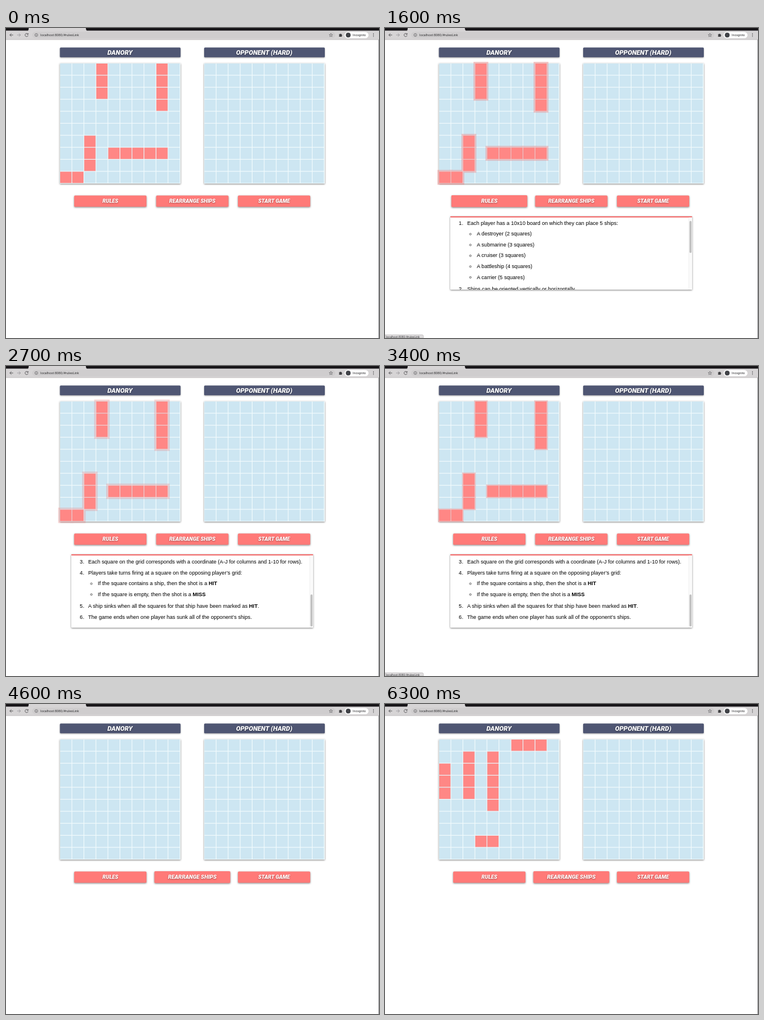
An HTML page for the animation above (6400 ms loop, 640 px wide and 532 px high).

```html
<!DOCTYPE html>
<html lang="en">
<head>
<meta charset="utf-8">
<title>Ship game</title>
<style>
  html, body { margin: 0; width: 100%; height: 100%; overflow: hidden; background: #fff; }
  svg { display: block; width: 100%; height: 100%; }
  .chrome { font-family: Roboto, sans-serif; }
  .comic { font-family: Roboto, sans-serif; font-style: italic; font-weight: 900; fill: #fff; text-anchor: middle; }
  .comic, .raised { filter: drop-shadow(0 1px 1px rgba(0, 0, 0, .35)); }
  .board, .button, #panel { filter: drop-shadow(0 1.5px 1.5px rgba(0, 0, 0, .5)); }
  #list { font: 9.08px "Liberation Sans", Arial, sans-serif; }
  .number { text-anchor: end; }
</style>
</head>
<body>
<svg id="stage" viewBox="0 0 640 532" preserveAspectRatio="none">
  <defs>
    <clipPath id="panelClip"><rect id="reveal" x="105" y="318" width="430"/></clipPath>
    <clipPath id="listClip"><rect x="112" y="325" width="415" height="124"/></clipPath>
  </defs>

  <g class="chrome">
    <rect width="640" height="6" fill="#171518"/>
    <path d="M36 6Q39 5 39 0H137Q137 5 141 6Z" fill="#d6d4d5"/>
    <rect y="4.5" width="640" height="15.5" fill="#d6d4d5"/>
    <rect x="45" y="6.5" width="520" height="11" rx="5.5" fill="#cfcdce"/>
    <path d="M0 20H640" stroke="#b5b3b4" stroke-width=".7"/>
    <g fill="none" stroke="#4b4b4d" stroke-width=".9">
      <path d="M12.3 12H6.7M9.2 9.4L6.6 12L9.2 14.6"/>
      <path d="M19.2 12H24.8M22.3 9.4L24.9 12L22.3 14.6" stroke="#97959a"/>
      <path d="M37.4 10.2A2.7 2.7 0 1 0 38 12.8M38 9V11H35.8"/>
      <circle cx="52" cy="12" r="2.5" stroke-width=".6"/>
      <path d="M52 11.7V13.5M52 10.4V11" stroke-width=".7"/>
      <path d="M557.5 9.2L558.3 11.2L560.4 11.3L558.8 12.7L559.3 14.8L557.5 13.6L555.7 14.8L556.2 12.7L554.6 11.3L556.7 11.2Z" stroke-width=".6"/>
    </g>
    <text x="59" y="14" font-size="5.7" fill="#343436">localhost:8080/#rulesLink</text>
    <path d="M571.5 10.5H573A1.1 1.1 0 0 1 575 10.5H576.2V11.8A1.1 1.1 0 0 1 576.2 13.8V15H571.5V13.4A1 1 0 0 0 571.5 11.9Z" fill="#404043"/>
    <rect x="581" y="6.8" width="41" height="10.8" rx="5.4" fill="#fff"/>
    <circle cx="587.2" cy="12.2" r="4.1" fill="#404247"/>
    <text x="595" y="14.2" font-size="5.4" fill="#303033">Incognito</text>
    <g fill="#404043"><circle cx="630.5" cy="9.8" r=".7"/><circle cx="630.5" cy="12.2" r=".7"/><circle cx="630.5" cy="14.6" r=".7"/></g>
    <path d="M639.5 20V532" stroke="#77777a" stroke-width=".8"/>
  </g>

  <g id="boards"></g>
  <g id="halo"></g>
  <g id="ships"></g>
  <g id="buttons"></g>

  <g clip-path="url(#panelClip)">
    <g id="panel">
      <rect x="112" y="323" width="415" height="126" rx="1.5" fill="#fff"/>
      <rect x="112" y="323" width="415" height="2.2" rx="1" fill="#f37575"/>
    </g>
    <g clip-path="url(#listClip)">
      <g id="list"></g>
      <rect x="521.2" y="325" width="5.8" height="124" fill="#fafafa"/>
      <path d="M521.2 325V449" stroke="#e8e8e8" stroke-width=".6"/>
      <rect id="thumb" x="522.4" width="3.6" height="55" rx="1.8" fill="#c1c1c1"/>
    </g>
  </g>

  <g id="status" class="chrome">
    <path d="M0 526.5H64Q66 526.5 66 529V532H0Z" fill="#dedcdd" stroke="#b4b2b3" stroke-width=".6"/>
    <text x="1.5" y="532.2" font-size="5" fill="#49494c">localhost:8080/#rulesLink</text>
  </g>
</svg>

<script>
const LOOP = 6400, STEP = 100, CELL = 20.62, TOP = 61;
const $ = id => document.getElementById(id);

function add(parent, tag, attrs, text = '') {
  const node = document.createElementNS('http://www.w3.org/2000/svg', tag);
  for (const key in attrs) node.setAttribute(key, attrs[key]);
  node.textContent = text;
  return parent.appendChild(node);
}

function addCell(parent, x, col, row, fill, spread = 0) {
  add(parent, 'rect', {
    x: x + col * CELL - spread, y: TOP + row * CELL - spread,
    width: CELL - 1.2 + 2 * spread, height: CELL - 1.2 + 2 * spread, fill
  });
}

function addBoard(x, title) {
  const g = $('boards');
  add(g, 'rect', { x: x - .5, y: 33.5, width: 207, height: 16.8, rx: 1.5, fill: '#4f5673', class: 'raised' });
  add(g, 'text', { x: x + 102.5, y: 45.8, 'font-size': 11.2, class: 'comic' }, title);
  add(g, 'rect', { x: x - .5, y: 60.5, width: 207, height: 206.5, fill: '#f1fafc', class: 'board' });
  for (let i = 0; i < 100; i++) addCell(g, x, i % 10, Math.floor(i / 10), '#cde6f2');
}
addBoard(93, 'DANORY');
addBoard(340.5, 'OPPONENT (HARD)');

function addButton(x, label) {
  const g = add($('buttons'), 'g', {});
  add(g, 'rect', { x: x - 62, y: 287.5, width: 124, height: 19.2, rx: 1.5, fill: '#ff7a78', class: 'button' });
  add(g, 'text', { x, y: 300.3, 'font-size': 9.1, class: 'comic' }, label);
  return scale => g.setAttribute('transform',
    `translate(${x} 297) scale(${scale}) translate(${-x} -297)`);
}
const scaleRules = addButton(179, 'RULES');
const scaleRearrange = addButton(319.7, 'REARRANGE SHIPS');
addButton(460, 'START GAME');

// A leading "-" marks a nested line; *word* is bold.
const rules = [
  'Each player has a 10x10 board on which they can place 5 ships:',
  '-A destroyer (2 squares)', '-A submarine (3 squares)', '-A cruiser (3 squares)',
  '-A battleship (4 squares)', '-A carrier (5 squares)',
  'Ships can be oriented vertically or horizontally.',
  'Each square on the grid corresponds with a coordinate (A-J for columns and 1-10 for rows).',
  'Players take turns firing at a square on the opposing player’s grid:',
  '-If the square contains a ship, then the shot is a *HIT*',
  '-If the square is empty, then the shot is a *MISS*',
  'A ship sinks when all the squares for that ship have been marked as *HIT*.',
  'The game ends when one player has sunk all of the opponent’s ships.'
];
let y = 337.8, number = 0;
rules.forEach((rule, i) => {
  const nested = rule[0] === '-';
  if (i) y += !nested && rules[i - 1][0] === '-' ? 20.5 : 18.55;
  if (nested) add($('list'), 'circle', { cx: 146.5, cy: y - 2.6, r: 1.5, fill: 'none', stroke: '#000', 'stroke-width': .6 });
  else add($('list'), 'text', { x: 134.2, y, class: 'number' }, `${++number}.`);
  const line = add($('list'), 'text', { x: nested ? 157.5 : 141, y });
  rule.slice(nested ? 1 : 0).split('*').forEach((part, j) =>
    add(line, 'tspan', { 'font-weight': j % 2 ? 700 : 400 }, part));
});

// Each ship: column, row, length, vertical.
const layouts = [
  { start: 0, ships: [[3, 0, 3, 1], [8, 0, 4, 1], [2, 6, 3, 1], [4, 7, 5, 0], [0, 9, 2, 0]] },
  { start: 4500, ships: [] },
  { start: 4900, ships: [[0, 0, 5, 1], [1, 4, 3, 0], [4, 2, 3, 0], [4, 3, 2, 0], [9, 1, 4, 1]] },
  { start: 6300, ships: [[6, 0, 3, 0], [2, 1, 4, 1], [4, 1, 5, 1], [0, 2, 3, 1], [3, 8, 2, 0]] }
];

const clamp = v => Math.max(0, Math.min(1, v));
const smooth = v => v * v * (3 - 2 * v);
const ramp = (t, from, to) => smooth(clamp((t - from) / (to - from)));
const between = (t, from, to) => t >= from && t < to;

function drawShips(t) {
  const { start, ships } = layouts.filter(l => l.start <= t).pop();
  const phase = (t - start) % 1000 / 1000;
  $('halo').replaceChildren();
  $('ships').replaceChildren();
  $('halo').setAttribute('opacity', .42 * Math.sin(Math.PI * phase) ** 2);
  for (const [col, row, length, vertical] of ships)
    for (let i = 0; i < length; i++) {
      const c = col + (vertical ? 0 : i), r = row + (vertical ? i : 0);
      addCell($('halo'), 93, c, r, '#ee7775', 5 * phase);
      addCell($('ships'), 93, c, r, '#ff8785');
    }
}

function draw(t) {
  drawShips(t);
  scaleRules(1 + .05 * (ramp(t, 200, 500) - ramp(t, 1700, 2000) + ramp(t, 3400, 3700) - ramp(t, 3900, 4200)));
  scaleRearrange(1 + .05 * ramp(t, 4200, 4500));
  $('reveal').setAttribute('height', 140 * (ramp(t, 500, 900) - ramp(t, 3600, 4000)));

  const scroll = 130.5 * (1 - (1 - clamp((t - 1650) / 850)) ** 3);
  $('list').setAttribute('transform', `translate(0 ${-scroll})`);
  $('thumb').setAttribute('y', 331 + scroll * 61 / 130.5);

  const linkHovered = between(t, 300, 1900) || between(t, 3300, 4100);
  $('status').setAttribute('visibility', linkHovered ? 'visible' : 'hidden');
}

function tick() {
  draw(Math.floor(performance.now() % LOOP / STEP) * STEP);
  requestAnimationFrame(tick);
}
tick();
</script>
</body>
</html>
```
